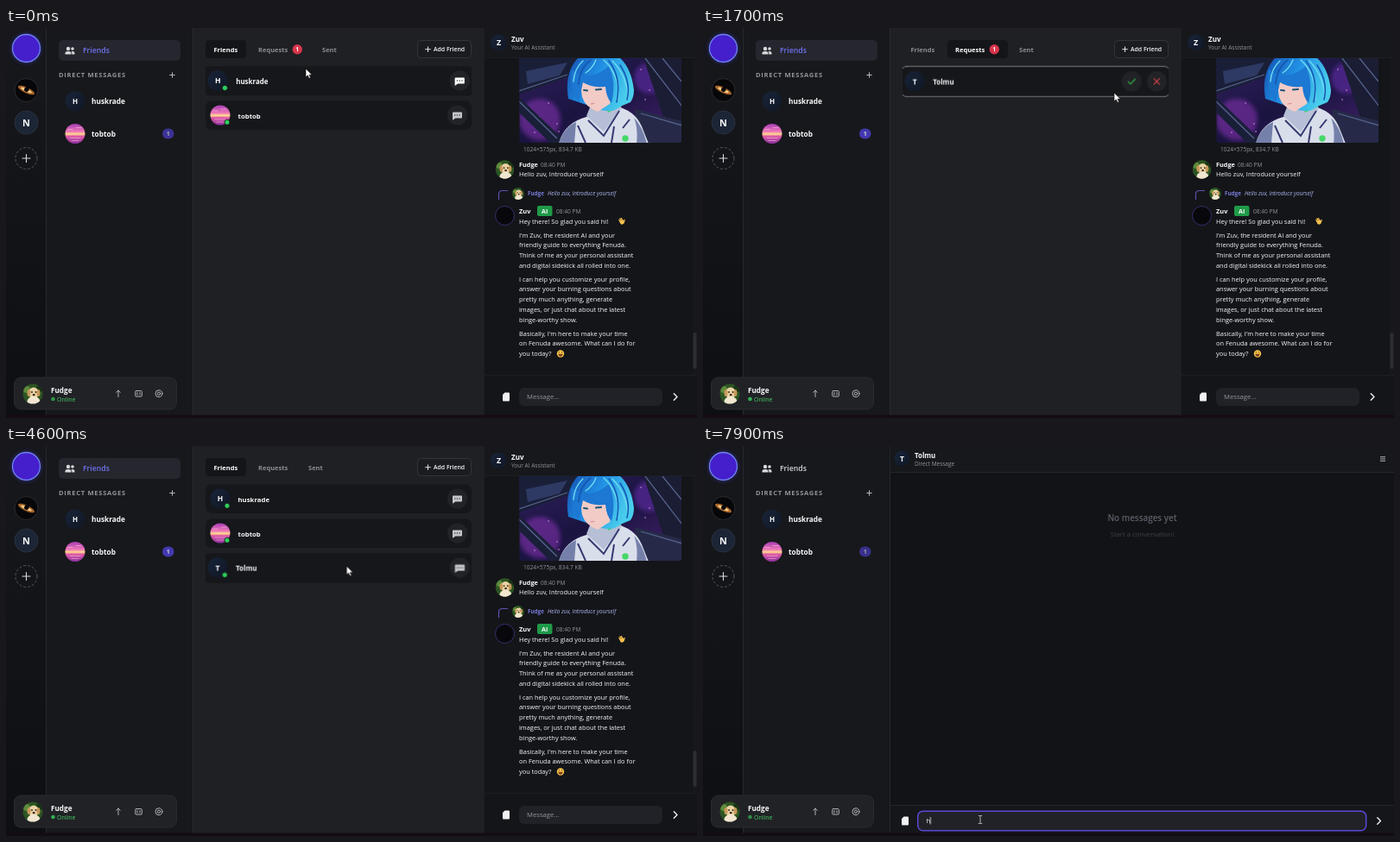
An HTML page that plays this animation: 800 px wide and 452 px high, repeating every 8 s.

```html
<!DOCTYPE html>
<html lang="en">
<head>
<meta charset="utf-8">
<title>Chat app</title>
<style>
html, body { margin: 0; width: 100%; height: 100%; overflow: hidden; background: #121317; }
svg { display: block; width: 800px; height: 452px; font: 500 7.4px "Open Sans", "Noto Sans", sans-serif; fill: #f8f8fa; }
.b { font-weight: 700; }
.s { font-weight: 600; }
.mid { text-anchor: middle; }
.grey { fill: #92949c; }
.tab { font-size: 7.5px; font-weight: 700; fill: #8b8d95; }
.name { font-size: 7.8px; font-weight: 700; }
.dm { font-size: 8.3px; font-weight: 700; }
.small { font-size: 6.5px; }
.time { font-size: 6.6px; fill: #92949c; }
.line { fill: none; stroke-linecap: round; stroke-linejoin: round; }

/* hard switches */
.sw { animation: 8s step-end infinite; }
.home { animation-name: home; }
.reqs { animation-name: reqs; }
.list { animation-name: list; }
.none { animation-name: none-left; }
.badge { animation-name: badge; }
.later { animation-name: later; }
.chat { animation-name: chat; }
.nav { animation-name: nav; }
.nav-bg { animation-name: nav-bg; }
.t1 { animation-name: t1; }
.t2 { animation-name: t2; }
.t3 { animation-name: t3; }
.focus { animation-name: focus; }
.hint { animation-name: hint; }
.typed { animation-name: typed; }
.caret { animation-name: caret; }
.arrow { animation-name: arrow; }
.hand { animation-name: hand; }
.beam { animation-name: beam; }
@keyframes home { 0% {opacity:1} 11.25% {opacity:0} 45.6% {opacity:1} 75.6% {opacity:0} }
@keyframes reqs { 0% {opacity:0} 11.25% {opacity:1} 45.6% {opacity:0} }
@keyframes list { 0% {opacity:0} 11.25% {opacity:1} 28% {opacity:0} }
@keyframes none-left { 0% {opacity:0} 28% {opacity:1} 45.6% {opacity:0} }
@keyframes badge { 0% {opacity:1} 28% {opacity:0} }
@keyframes later { 0% {opacity:0} 28% {opacity:1} }
@keyframes chat { 0% {opacity:0} 75.6% {opacity:1} }
@keyframes nav { 0% {color:#7073f0} 75.6% {color:#d4d5d9} }
@keyframes nav-bg { 0% {opacity:1} 75.6% {opacity:0} }
@keyframes t1 { 0% {fill:#fff} 11.25% {fill:#8b8d95} 43.7% {fill:#fff} }
@keyframes t2 { 0% {fill:#8b8d95} 5% {fill:#fff} 45.6% {fill:#8b8d95} }
@keyframes t3 { 0% {transform:none} 28% {transform:translateX(-16px)} }
@keyframes focus { 0% {opacity:0} 87.5% {opacity:1} }
@keyframes hint { 0% {opacity:1} 97.5% {opacity:0} }
@keyframes typed { 0% {opacity:0} 97.5% {opacity:1} }
@keyframes caret { 0% {opacity:0} 87.5% {opacity:1} 94% {opacity:0} 97.5% {opacity:1;transform:translateX(4.5px)} }
@keyframes arrow { 0% {opacity:1} 68% {opacity:0} 75.6% {opacity:1} 84.5% {opacity:0} }
@keyframes hand { 0% {opacity:0} 68% {opacity:1} 75.6% {opacity:0} }
@keyframes beam { 0% {opacity:0} 84.5% {opacity:1} }

/* smooth motion */
.pulse { animation: pulse 8s ease-in-out infinite; }
@keyframes pulse {
  0% {opacity:.68} 3.75%, 27.5%, 51.25%, 75%, 98.75% {opacity:.62}
  15.6%, 39.4%, 63.1%, 86.9% {opacity:1} 100% {opacity:.63}
}
.row { transform-origin: 385px 61px; }
.leave { animation: leave 8s ease-out infinite; }
.enter { animation: enter 8s ease-out infinite; }
.ask { animation: ask 8s ease-out infinite; }
.edge { animation: edge 8s linear infinite; }
.talk-on { animation: talk-on 8s ease-out infinite; transform-origin: 522.5px 61px; }
.ok { animation: ok 8s linear infinite; }
@keyframes leave { 0% {transform:scale(1.02);color:#fff} 3.5%, 100% {transform:none;color:#c4c5c9} }
@keyframes enter { 0%, 55% {transform:none} 58%, 100% {transform:scale(1.022)} }
@keyframes ask { 0%, 14% {transform:none} 17%, 100% {transform:scale(1.02)} }
@keyframes edge { 0%, 14% {opacity:0} 17%, 100% {opacity:1} }
@keyframes talk-on { 0%, 67.5% {opacity:0;transform:none} 70%, 100% {opacity:1;transform:scale(1.1)} }
@keyframes ok { 0%, 24.5% {fill:#222327} 26%, 100% {fill:#1f3a29} }
.cursor { animation: move 8s ease-in-out infinite; }
@keyframes move {
  0% {transform:translate(347px,47px)} 6.25% {transform:translate(327px,20px)}
  11.5% {transform:translate(318px,26px)} 21.25% {transform:translate(476px,75px)}
  25.5%, 28% {transform:translate(495px,63px)} 33.75% {transform:translate(482px,66px)}
  38% {transform:translate(460px,58px)} 44.5% {transform:translate(258px,26px)}
  47.5% {transform:translate(257px,27px)} 56% {transform:translate(390px,139px)}
  67.5% {transform:translate(516px,145px)} 72.5%, 77% {transform:translate(521px,143px)}
  86% {transform:translate(328px,430px)} 91%, 100% {transform:translate(321px,433px)}
}
</style>
</head>
<body>
<svg viewBox="0 0 800 452">
<defs>
  <linearGradient id="rail" x2="0" y2="1"><stop stop-color="#17181c"/><stop offset="1" stop-color="#0e0f12"/></linearGradient>
  <linearGradient id="navy" x2="1" y2="1"><stop stop-color="#18243a"/><stop offset="1" stop-color="#101724"/></linearGradient>
  <linearGradient id="dusk" x2="0" y2="1">
    <stop stop-color="#a63bb4"/><stop offset=".4" stop-color="#f07ab8"/><stop offset=".52" stop-color="#ffe08a"/>
    <stop offset=".62" stop-color="#e05ca8"/><stop offset="1" stop-color="#8a2f9c"/>
  </linearGradient>
  <linearGradient id="space" x2="1" y2="1"><stop stop-color="#30205c"/><stop offset=".5" stop-color="#1a1440"/><stop offset="1" stop-color="#4a2270"/></linearGradient>
  <linearGradient id="hair" x2="1" y2=".4"><stop stop-color="#1450b0"/><stop offset=".5" stop-color="#2190e4"/><stop offset="1" stop-color="#49cdec"/></linearGradient>
  <filter id="glow" x="-50%" y="-50%" width="200%" height="200%"><feGaussianBlur stdDeviation="2.5"/></filter>
  <clipPath id="rows"><rect x="231" y="40" width="308" height="122"/></clipPath>
  <clipPath id="pic"><path d="M594.5 35H782v95q0 3-3 3H597.500q-3 0-3-3z"/></clipPath>
  <clipPath id="disc"><circle r="11.5"/></clipPath>

  <g id="pup" clip-path="url(#disc)">
    <rect x="-12" y="-12" width="24" height="24" fill="#2c5522"/>
    <circle cx="-7" cy="-5" r="4" fill="#5d8a3b"/><circle cx="8" cy="-6" r="4" fill="#173515"/>
    <ellipse cx="1" cy="-1" rx="6" ry="6.500" fill="#ead3a4"/>
    <ellipse cx="1" cy="9" rx="7.500" ry="6" fill="#f1e6d0"/>
    <ellipse cx="-4.500" cy="-1" rx="2" ry="4" fill="#c7995c"/><ellipse cx="6.500" cy="-1" rx="2" ry="4" fill="#c7995c"/>
    <circle cx="-1" cy="-2" r=".9" fill="#2b1d14"/><circle cx="3.500" cy="-2" r=".9" fill="#2b1d14"/>
    <ellipse cx="1.200" cy="1.200" rx="1.500" ry="1.100" fill="#2b1d14"/>
  </g>
  <g id="sunset">
    <circle r="11.5" fill="url(#dusk)"/>
    <path class="line" d="M-8-5h5M1-7h6M-6 5h12M-4 8h8" stroke="#ffc0e0" stroke-width=".8" opacity=".7"/>
  </g>
  <g id="face"><circle r="11.5" fill="url(#navy)"/></g>
  <circle id="dot" cx="256" cy="69.3" r="3" fill="#2fce5c" stroke="#16171a" stroke-width=".8"/>
  <g id="bubble">
    <path d="M517.800 57.500h9.400q.8 0 .8.8v5.400q0 .8-.8.8h-6.700l-3.500 2.300v-8.500q0-.8.8-.8z" fill="currentColor"/>
    <path class="line" d="M519.700 61h.1m2.600 0h.1m2.600 0h.1" stroke="#303137" stroke-width="1.300"/>
  </g>
  <g id="talk"><circle cx="522.500" cy="61" r="11.500" fill="#222327"/><use href="#bubble"/></g>
  <rect id="bar" x="231" y="44.500" width="308" height="33.500" rx="7" fill="#16171a"/>
  <path id="page" d="M-1.500-5H3q1 0 1 1v8q0 1-1 1h-6q-1 0-1-1v-6.500z" fill="#f1f1f3"/>
  <path id="next" class="line" d="M-1.700-3.700 2 0l-3.700 3.700" stroke="#f1f1f3" stroke-width="1.400"/>
  <path id="plus" class="line" d="M-2.800 0h5.600M0-2.800v5.600" stroke="currentColor" stroke-width="1"/>
</defs>

<!-- server rail -->
<rect width="800" height="452" fill="#121317"/>
<rect width="46" height="452" fill="url(#rail)"/>
<rect x="46" width="171" height="452" fill="#17181b"/>
<path d="M46.500 0v452" stroke="#27282d"/>
<circle cx="23.500" cy="23.500" r="16.500" fill="#3c3bd0" filter="url(#glow)" opacity=".65"/>
<circle cx="23.500" cy="23.500" r="16" fill="#441fcb" stroke="#6f83ee" stroke-width="1.300"/>
<circle cx="23.500" cy="72" r="13.500" fill="#07070a" stroke="#2b2c31"/>
<g transform="translate(23.500 72) rotate(25)">
  <ellipse rx="10.500" ry="3.200" fill="#a5652a"/><ellipse rx="7" ry="1.700" fill="#ffd08a"/><circle cy="-1" r="2.800" fill="#07070a"/>
</g>
<circle cx="23.500" cy="109.500" r="13.500" fill="#1c2535" stroke="#2a3140"/>
<text class="b mid" x="23.500" y="113.500" font-size="11">N</text>
<circle cx="23.500" cy="151" r="12.500" fill="none" stroke="#55575e" stroke-dasharray="3 2"/>
<path class="line" d="M19 151h9m-4.500-4.500v9" stroke="#d9dade" stroke-width="1.100"/>

<!-- direct messages column -->
<rect class="sw nav-bg" x="61" y="14" width="141" height="24" rx="5" fill="#25262e"/>
<g class="sw nav" fill="currentColor">
  <g fill="#d8d9de"><circle cx="72" cy="24" r="2.200"/><circle cx="77" cy="24" r="1.800"/>
  <path d="M68.500 30.500v-1.500q0-2 3.500-2t3.500 2v1.500zM76.300 30.500v-1.700q0-1-.8-1.700 4-.5 4 1.900v1.500z"/></g>
  <text class="s" x="89" y="29.300" font-size="8.700">Friends</text>
</g>
<text class="b grey" x="61" y="57" font-size="7.600" letter-spacing=".7">DIRECT MESSAGES</text>
<use href="#plus" x="192.500" y="54.500" color="#b5b6bc"/>
<use href="#face" x="80" y="85"/><text class="b mid" x="80" y="88" font-size="8">H</text>
<text class="dm" x="99" y="88">huskrade</text>
<use href="#sunset" x="80" y="122.500"/>
<text class="dm" x="99" y="125.600">tobtob</text>
<g class="pulse"><rect x="181" y="116.500" width="13.500" height="12" rx="6" fill="#4d3fd0"/>
<text class="b mid" x="187.800" y="125" font-size="7">1</text></g>

<!-- account card -->
<rect x="9.500" y="405" width="188" height="37" rx="8" fill="#212226" stroke="#2a2b30"/>
<use href="#pup" x="31" y="424"/>
<text class="b" x="52" y="422.600" font-size="8.200">Fudge</text>
<circle class="pulse" cx="54.500" cy="430" r="2.300" fill="#35d05c"/>
<text x="59" y="432.700" font-size="7" fill="#45cf66">Online</text>
<g class="line" stroke="#b0b1b7">
  <path d="M130 427.500v-7.500m-2.200 2.300L130 420l2.200 2.300"/>
  <rect x="149.800" y="420.500" width="7.500" height="6.500" rx="1"/><path d="M152 422.500v2.500m3-2.500v2.500"/>
  <circle cx="177" cy="423.700" r="4"/><circle cx="177" cy="423.700" r="1.700"/>
</g>

<!-- friends page -->
<rect x="217" width="336" height="452" fill="#1f2024"/>
<path d="M216.500 0v452" stroke="#292a2f"/>
<rect class="sw home" x="231" y="14" width="47" height="21" rx="4" fill="#141519"/>
<g class="sw reqs">
  <rect class="sw badge" x="283" y="14" width="70" height="21" rx="4" fill="#141519"/>
  <rect class="sw later" x="283" y="14" width="54" height="21" rx="4" fill="#141519"/>
</g>
<text class="tab sw t1" x="240.500" y="27.500">Friends</text>
<text class="tab sw t2" x="292" y="27.500">Requests</text>
<text class="tab sw t3" x="366" y="27.500">Sent</text>
<g class="sw badge"><circle cx="337.300" cy="24.700" r="5.700" fill="#d8344a"/><text class="b mid" x="337.300" y="27.200" font-size="6.800">1</text></g>
<rect x="476.500" y="14.500" width="62" height="20" rx="4" fill="#1b1c20" stroke="#33343b"/>
<use href="#plus" x="488.500" y="24.700" color="#e4e4e8"/>
<text class="s" x="495" y="27.300" font-size="6.900">Add Friend</text>

<g clip-path="url(#rows)">
  <g class="sw home" color="#c4c5c9">
    <g class="row leave"><use href="#bar"/><use href="#face" x="248" y="61"/>
      <text class="b mid" x="248" y="64.300" font-size="8.500">H</text><use href="#dot"/>
      <text class="name" x="268.500" y="64.500">huskrade</text><use href="#talk"/></g>
    <g transform="translate(0 40)"><use href="#bar"/><use href="#sunset" x="248" y="61"/><use href="#dot"/>
      <text class="name" x="268.500" y="64.500">tobtob</text><use href="#talk"/></g>
    <g class="sw later" transform="translate(0 80)"><g class="row enter"><use href="#bar"/><use href="#face" x="248" y="61"/>
      <text class="b mid" x="248" y="64.300" font-size="8.500">T</text><use href="#dot"/>
      <text class="name" x="268.500" y="64.500">Tolmu</text><use href="#talk"/>
      <g class="talk-on" color="#fff"><circle cx="522.500" cy="61" r="11.800" fill="#4424c6"/><use href="#bubble"/></g></g></g>
  </g>
  <g class="sw list" transform="translate(0 .8)">
    <g class="row ask"><use href="#bar"/>
      <use href="#face" x="248" y="61"/><text class="b mid" x="248" y="64.300" font-size="8.500">T</text>
      <text class="name" x="268.500" y="64.500">Tolmu</text>
      <circle class="ok" cx="494" cy="61" r="11.500"/><circle cx="522.500" cy="61" r="11.500" fill="#222327"/>
      <path class="line" d="m490 61.300 2.700 2.700 5.300-5.500" stroke="#35b34a" stroke-width="1.200"/>
      <path class="line" d="m519.300 57.800 6.400 6.400m0-6.400-6.400 6.400" stroke="#d8444c" stroke-width="1.200"/></g>
    <rect class="edge line" x="229" y="43.700" width="312" height="35" rx="7" stroke="#96979b" stroke-width=".8"/>
  </g>
</g>
<text class="mid grey sw none" x="385" y="74" font-size="8.700">No friend requests found.</text>

<!-- assistant panel -->
<rect x="553" width="247" height="452" fill="#141519"/>
<rect x="554" width="246" height="34" fill="#17181c"/>
<path d="M553.500 0v452M554 34.500h246M554 402.500h246" stroke="#1d1e22"/>
<use href="#face" transform="translate(570.500 17) scale(.82)"/>
<text class="b mid" x="570.500" y="20.300" font-size="9">Z</text>
<text class="b" x="585" y="15.600" font-size="8">Zuv</text>
<text class="small grey" x="585" y="25.200">Your AI Assistant</text>

<g clip-path="url(#pic)">
  <rect x="594" y="35" width="189" height="99" fill="url(#space)"/>
  <circle cx="618" cy="106" r="24" fill="#8b35b8" opacity=".55" filter="url(#glow)"/>
  <circle cx="745" cy="58" r="18" fill="#5a2a9c" opacity=".7" filter="url(#glow)"/>
  <path class="line" d="M604 92h.1M617 103h.1M628 87h.1M612 121h.1M638 111h.1M735 48h.1M745 72h.1M752 60h.1M740 83h.1M640 120h.1" stroke="#f1a6f0" stroke-width="1.300"/>
  <path d="M594 35h70l-14 22-56 20zM594 80l48 46 8 8h-19l-37-36z" fill="#1a1f38"/>
  <path d="M602 50l48-10-9 15-37 10z" fill="#2e3a64"/>
  <path d="M738 35h45v98h-12z" fill="#1b1d34"/>
  <path d="M728 94l55 14v26h-52z" fill="#262a48"/>
  <path d="M740 35l43 56M594 73l56-19M735 99l48 14M594 85l44 43M760 35l22 27" stroke="#56628d" stroke-width="1.300" fill="none"/>
  <!-- suit -->
  <path d="M640 134q6-24 32-31l32-13q24 5 32 24l8 20z" fill="#d9deeb"/>
  <path d="M640 134q6-19 20-25l-2 25zM727 104q10 10 15 30h-12q2-18-3-30z" fill="#7580aa"/>
  <path d="M672 102l20 18 21-27-5-8-32 7z" fill="#b6bfd6"/>
  <path d="M674 107l18 18 18-29M662 113l9 20M704 114l-3 19M722 106l-8 10" stroke="#353a70" stroke-width="2" fill="none"/>
  <circle cx="717" cy="128" r="3.700" fill="#46d869"/><path d="M694 91l17-6 1 6-15 7z" fill="#3fcf7a"/>
  <!-- head -->
  <path d="M651 82q-5-31 12-48h47q14 12 17 38 0 8-4 14-9 3-18 9-12 3-24-3z" fill="url(#hair)"/>
  <path d="M664 58l30-3 9 18-4 15-14 9q-14-5-18-17z" fill="#f3cbc6"/>
  <path d="M655 48q20 16 43-4 9 20 3 43-6-6-7-19-15 2-26-5l-5 23q-11-15-8-38z" fill="#1c78d2"/>
  <path class="line" d="M668 38q-10 9-11 24M692 37q18 16 17 46M702 38q17 18 18 42M683 37q-4 10-12 15" stroke="#6fdcf0" stroke-width="1.400"/>
  <path class="line" d="M677 37q-13 10-14 28M698 38q15 20 9 48M711 43q13 20 8 40" stroke="#1458b4" stroke-width="1.600"/>
  <path class="line" d="M669 72l4 .5m10-1l6-.5" stroke="#1c5578" stroke-width="2.200"/>
  <path class="line" d="M677 88l4-.5" stroke="#c77880" stroke-width=".8"/>
</g>
<text class="time" x="599" y="142.700">1024×575px, 834.7 KB</text>

<use href="#pup" transform="translate(577.500 164) scale(.93)"/>
<text class="b" x="594" y="160.500" font-size="7.300">Fudge</text><text class="time" x="619" y="160.500">08:40 PM</text>
<text x="594" y="172">Hello zuv, Introduce yourself</text>

<path class="line" d="M570.500 198.500v-6q0-4 4-4h6" stroke="#5953b0" stroke-width="1.200"/>
<use href="#pup" transform="translate(593 192) scale(.6)"/>
<text class="b" x="604" y="194.400" font-size="6.300" fill="#767ad6">Fudge</text>
<text x="627" y="194.400" font-size="6.400" font-style="italic" fill="#aeb5ee">Hello zuv, Introduce yourself</text>

<circle cx="577.500" cy="217.500" r="11" fill="#08080c" stroke="#34306e"/>
<text class="b" x="594" y="214.700" font-size="7.400">Zuv</text>
<rect x="615" y="206" width="17.500" height="12" rx="2" fill="#1f9a48"/><text class="b mid" x="623.700" y="214.700" font-size="7.200">AI</text>
<text class="time" x="637" y="214.700">08:40 PM</text>
<text x="594" y="226.700">Hey there! So glad you said hi!</text>
<g transform="translate(712.500 224) rotate(-25) scale(.9)" fill="#f4c04e">
  <rect x="-2.500" y="-1" width="5.500" height="5" rx="2"/>
  <path class="line" d="M-1.800 0v-3M0 0v-4M1.700 0v-3.300M3 2l1.300-2" stroke="#f4c04e" stroke-width="1.400"/>
</g>
<text x="594" y="242.700">I'm Zuv, the resident AI and your</text>
<text x="594" y="254.300">friendly guide to everything Fenuda.</text>
<text x="594" y="266">Think of me as your personal assistant</text>
<text x="594" y="277.700">and digital sidekick all rolled into one.</text>
<text x="594" y="293.700">I can help you customize your profile,</text>
<text x="594" y="305.400">answer your burning questions about</text>
<text x="594" y="317">pretty much anything, generate</text>
<text x="594" y="328.700">images, or just chat about the latest</text>
<text x="594" y="340.700">binge-worthy show.</text>
<text x="594" y="356.700">Basically, I'm here to make your time</text>
<text x="594" y="368.400">on Fenuda awesome. What can I do for</text>
<text x="594" y="380.200">you today?</text>
<circle cx="642" cy="377.500" r="4.200" fill="#f5c449"/><path d="M639.300 377.800h5.400q-.5 3-2.700 3t-2.700-3z" fill="#7b3d20"/>
<path class="line" d="M640.300 375.800h.1m3.200 0h.1" stroke="#5a3414" stroke-width="1.200"/>

<rect x="795" y="35" width="5" height="367" fill="#17181c"/><rect x="795.500" y="353" width="4" height="42" rx="2" fill="#2d2e33"/>
<use href="#page" x="579" y="427.500"/>
<rect x="594" y="417" width="166" height="21" rx="6" fill="#212227"/>
<text class="grey" x="603" y="430.300" font-size="7.700">Message...</text>
<use href="#next" x="775" y="427.500"/>

<!-- conversation page -->
<g class="sw chat">
  <rect x="217" width="583" height="452" fill="#121317"/>
  <rect x="217" width="583" height="30" fill="#17181c"/><rect x="217" y="417" width="583" height="35" fill="#15161a"/>
  <path d="M216.500 0v452M217 30.500h583M217 416.500h583" stroke="#25262b"/>
  <use href="#face" transform="translate(230.500 14.500) scale(.78)"/><text class="b mid" x="230.500" y="17.700" font-size="8.500">T</text>
  <text class="b" x="245" y="13.500" font-size="7.900">Tolmu</text>
  <text class="small grey" x="245" y="23">Direct Message</text>
  <path d="M784 12.700h6m-6 2.300h6m-6 2.300h6" stroke="#c3c4c9" stroke-width=".9"/>
  <text class="s mid" x="508.500" y="87" font-size="9.900" fill="#5d5f68">No messages yet</text>
  <text class="mid" x="508.500" y="104.700" font-size="7.700" fill="#3f4149">Start a conversation!</text>
  <use href="#page" x="234" y="434.500"/>
  <rect x="248.500" y="423" width="519.500" height="23" rx="6" fill="#212227"/>
  <rect class="sw focus line" x="248.700" y="423.200" width="519" height="22.500" rx="6" stroke="#5748d8" stroke-width="1.500"/>
  <text class="grey sw hint" x="258.500" y="437.200" font-size="7.700">Message...</text>
  <text class="sw typed" x="258.500" y="437.200" font-size="7.700">h</text>
  <path class="sw caret" d="M258.800 430v8.500" stroke="#f1f1f3" stroke-width=".8"/>
  <use href="#next" x="782.500" y="434.500"/>
</g>
<rect y="448.500" width="800" height="3.500" fill="#150b13"/>

<g class="cursor">
  <path class="sw arrow" d="M0 0v10l2.300-2.100 1.600 3.500 1.700-.8-1.500-3.300H7.300z" fill="#fff" stroke="#111" stroke-width=".7"/>
  <path class="sw hand" d="M-1.200-2.500q1-1 1.800 0V2l3.900.9q1 .3.900 1.500L4.700 8.500Q4.300 10 3 10H.2q-1 0-1.700-1L-4 5.300q0-1.300 1.200-1l1.600 1.200z" fill="#fff" stroke="#111" stroke-width=".7"/>
  <path class="sw beam line" d="M-1.800-4.500h1.300l.5.500.5-.5h1.300M0-4v8M-1.800 4.500h1.300L0 4l.5.500h1.300" stroke="#d5d6da" stroke-width=".8"/>
</g>
</svg>
</body>
</html>
```
